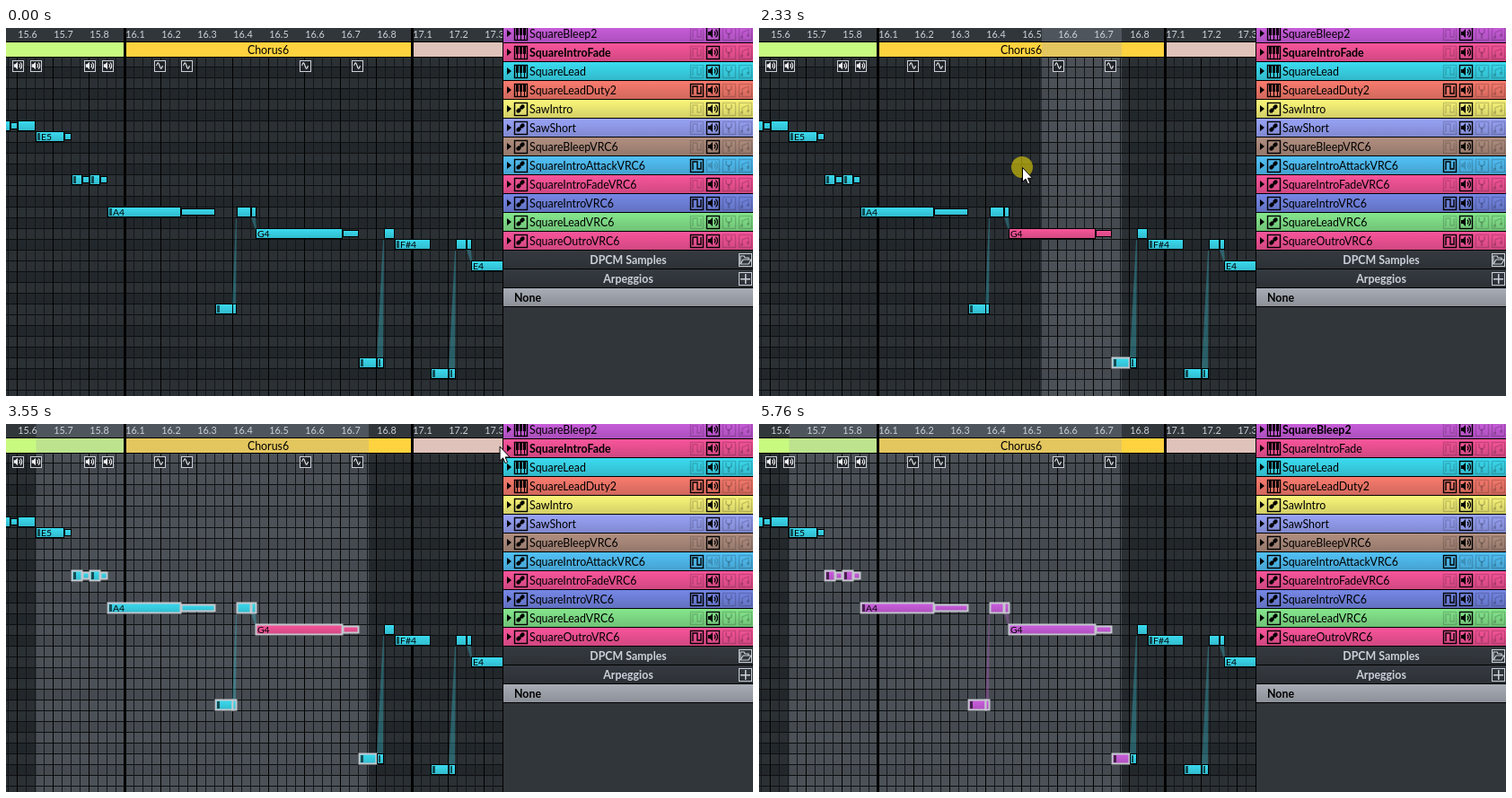
An HTML page with a canvas for the animation above (6.2 s loop, 832 px wide and 410 px high).

```html
<!DOCTYPE html>
<html>
<head>
<meta charset="utf-8">
<style>
html, body { margin: 0; height: 100%; overflow: hidden; background: #000; }
canvas { display: block; width: 832px; height: 410px; }
</style>
</head>
<body>
<canvas id="stage" width="832" height="410"></canvas>
<script>
const g = document.getElementById('stage').getContext('2d');
const LOOP = 6200, SPLIT = 553, SEL_RIGHT = 404;
const CYAN = '#3bdcf1', PINK = '#f8559a', PURPLE = '#cd5fe0', LIGHT = '#ccd1d9';
const FONT = 'Lato, "Open Sans", sans-serif';

// The screen refreshes at these moments: first, last, count
const times = [0];
for (const [a, b, n] of [[220, 780, 6], [880, 1440, 6], [1660, 2000, 4], [2210, 2770, 6],
  [2870, 3430, 6], [3550, 4110, 6], [4210, 4770, 6], [4870, 4870, 1], [5320, 5760, 5]])
  for (let i = 0; i < n; i++) times.push(a + (n > 1 ? (b - a) * i / (n - 1) : 0));

const ease = {
  in: u => u * u,
  out: u => 1 - (1 - u) ** 2,
  both: u => u * u * (3 - 2 * u)
};
// Pointer path: time, x, y, easing used to get there
const path = [
  [220, 727, 212], [780, 648, 25, 'both'], [880, 606, 37, 'in'], [1440, 345, 232, 'out'],
  [1660, 345, 232, 'in'], [2000, 403, 176, 'both'], [2110, 403, 176, 'in'],
  [2322, 293, 155, 'in'], [2870, 35, 142, 'out'], [2985, 36, 142, 'in'],
  [3430, 501, 33, 'both'], [4110, 652, 7, 'out'], [4770, 199, 180, 'both'],
  [5210, 199, 180, 'in'], [5650, 701, 348, 'both']
];
function pointer(t) {
  const i = path.findIndex(k => k[0] >= t);
  if (i < 0) return path[path.length - 1].slice(1);
  if (i === 0) return path[0].slice(1);
  const a = path[i - 1], b = path[i], u = ease[b[3]]((t - a[0]) / (b[0] - a[0]));
  return [a[1] + (b[1] - a[1]) * u, a[2] + (b[2] - a[2]) * u];
}

// Notes: x, width, row centre, release width, attack mark, label
const notes = [
  [-20, 25, 109, 8], [13, 20, 109, 0], [33, 32, 121, 8, 1, 'E5'],
  [73, 12, 169, 8, 1], [93, 12, 169, 8, 1], [113, 82, 205, 38, 1, 'A4'],
  [233, 20, 313, 0, 1], [252, 5, 313, 0], [257, 16, 205, 0], [273, 6, 205, 0],
  [278, 97, 229, 18, 0, 'G4'], [393, 20, 373, 0, 1], [413, 8, 373, 0, 1],
  [421, 12, 229, 0], [433, 40, 241, 0, 1, 'F#4'], [473, 20, 385, 0, 1],
  [493, 8, 385, 0, 1], [501, 12, 241, 0], [513, 6, 241, 0], [518, 40, 265, 0, 0, 'E4']
];
// Slides: left, right, from y, to y
const slides = [[252, 256, 308, 212], [273, 278, 211, 226], [413, 420, 368, 236],
  [493, 500, 380, 248], [513, 518, 247, 262]];

// Instruments: name, colour, duty icon lit
const rows = [
  ['SquareBleep2', PURPLE], ['SquareIntroFade', PINK], ['SquareLead', CYAN],
  ['SquareLeadDuty2', '#f97b6e', 1], ['SawIntro', '#fbf77a'], ['SawShort', '#98a3f7'],
  ['SquareBleepVRC6', '#b18f80'], ['SquareIntroAttackVRC6', '#52c1f7', 1],
  ['SquareIntroFadeVRC6', PINK], ['SquareIntroVRC6', '#7587e6', 1],
  ['SquareLeadVRC6', '#85e78d'], ['SquareOutroVRC6', PINK, 1]
];

function box(x, y, w, h, c) { g.fillStyle = c; g.fillRect(x, y, w, h); }
function shaded(x, y, w, h, c) {
  box(x, y, w, h, c);
  const s = g.createLinearGradient(0, y, 0, y + h);
  s.addColorStop(0, 'rgba(0,0,0,0)');
  s.addColorStop(1, 'rgba(0,0,0,.16)');
  box(x, y, w, h, s);
}
function frame(x, y, w, h, c, lw = 1) {
  g.strokeStyle = c; g.lineWidth = lw;
  g.strokeRect(x + .5, y + .5, w - 1, h - 1);
}
function text(s, x, y, size, c, align = 'left', weight = 400) {
  g.font = `${weight} ${size}px ${FONT}`;
  g.textAlign = align; g.textBaseline = 'middle'; g.fillStyle = c;
  g.fillText(s, x, y + 1);
}
function poly(p, fill, stroke, lw = 1) {
  g.beginPath();
  for (let i = 0; i < p.length; i += 2) g.lineTo(p[i], p[i + 1]);
  g.closePath();
  if (fill) { g.fillStyle = fill; g.fill(); }
  if (stroke) { g.strokeStyle = stroke; g.lineWidth = lw; g.stroke(); }
}
function line(p, c, lw = 1) {
  g.beginPath();
  for (let i = 0; i < p.length; i += 2) g.lineTo(p[i], p[i + 1]);
  g.strokeStyle = c; g.lineWidth = lw; g.stroke();
}
function at(x, y, draw, alpha = 1) {
  g.save(); g.translate(x, y); g.globalAlpha = alpha; draw(); g.restore();
}

// Icons, each centred on 0,0
function speaker(c) {
  poly([-5, -2, -3, -2, 0, -5, 0, 5, -3, 2, -5, 2], c);
  for (const r of [3, 5.5]) {
    g.beginPath(); g.arc(0, 0, r, -.9, .9);
    g.strokeStyle = c; g.lineWidth = 1.3; g.stroke();
  }
}
function sine(c) {
  g.beginPath(); g.moveTo(-4, 0);
  g.bezierCurveTo(-2, -7, -1, -3, 0, 0);
  g.bezierCurveTo(1, 3, 2, 7, 4, 0);
  g.strokeStyle = c; g.lineWidth = 1.2; g.stroke();
}
function border() { frame(-7, -7, 15, 15, '#000', 1.4); }
function piano() {
  border();
  for (const x of [-4, 0, 4]) { box(x - 1, -6, 3, 8, '#000'); box(x, 2, 1, 5, '#000'); }
}
function plug() {
  border();
  line([-4, 4, 4, -4], '#000', 2);
  poly([-5, 2, -2, -1, 1, 2, -2, 5], '#000');
  poly([-1, -2, 2, -5, 5, -2, 2, 1], '#000');
}
function duty() { border(); line([-4, 5, -4, -4, 1, -4, 1, 4, 5, 4, 5, -4], '#000', 1.4); }
function wrench() {
  border();
  line([0, 6, 0, 0], '#000', 2.5);
  line([-3, -5, -3, -1, 0, 1, 3, -1, 3, -5], '#000', 1.8);
}
function arp() {
  border();
  line([-3, 4, -3, -1, 4, -4, 4, 2], '#000', 1.3);
  box(-5, 3, 3, 3, '#000'); box(2, 1, 3, 3, '#000');
}

function drawGrid(selLeft) {
  box(0, 0, SPLIT, 410, '#2b3034');
  for (let k = -17; k < 15; k++)
    if ([1, 3, 6, 8, 10].includes((9 + k + 24) % 12)) box(0, 199 - 12 * k, SPLIT, 12, '#22272b');
  box(0, 0, SPLIT, 16, '#31363b');
  box(0, 16, 131, 17, '#c8fa80');
  box(134, 16, 318, 17, '#ffd23f');
  box(454, 16, 99, 17, '#dfc2b9');
  if (selLeft < SEL_RIGHT) box(selLeft, 0, SEL_RIGHT - selLeft, 410, 'rgba(157,164,175,.28)');
  box(0, 15, SPLIT, 1, '#000');
  box(0, 32, SPLIT, 1, '#000');
  for (let y = 43; y < 410; y += 12) box(0, y, SPLIT, 1, '#0d0f10');
  for (let x = 3; x < SPLIT; x += 10) box(x - 1, 33, 1, 377, (x - 13) % 40 ? '#14171a' : '#000');
  for (const x of [131, 451]) box(x, 0, 3, 410, '#000');

  for (let i = 0; i < 14; i++) {
    const beat = i + 5;
    text(`${15 + (beat >> 3)}.${beat % 8 + 1}`, 24 + 40 * i, 7, 10.8, LIGHT, 'center');
  }
  text('Chorus6', 292, 24, 12.4, '#000', 'center');

  const effect = (x, icon) => at(x, 42, () => {
    box(-6, -6, 12, 12, '#202428');
    frame(-6, -6, 13, 13, LIGHT);
    g.scale(.85, .85); icon('#f0f2f5');
  });
  for (const x of [13, 33, 93, 113]) effect(x, speaker);
  for (const x of [171, 201, 333, 391]) effect(x, sine);
}

function drawNotes(t, selLeft, hover) {
  const picked = x => x >= selLeft && x < SEL_RIGHT;
  const tint = x => t >= 4870 && picked(x) ? PURPLE : x === 278 && t >= 1660 ? PINK : CYAN;
  g.globalAlpha = .3;
  for (const [a, b, y0, y1] of slides) poly([a, y0, b, y0, b + 1, y1, b, y1], tint(a));
  g.globalAlpha = 1;
  for (const [x, w, y, tail, mark, label] of notes) {
    const c = tint(x), lit = x === 278 && hover;
    const edge = lit ? '#fff' : picked(x) ? '#c3c7cd' : '#000';
    const lw = edge === '#000' ? 1 : 2;
    if (tail) {
      shaded(x + w, y - 4, tail, 8, c);
      frame(x + w, y - 4, tail, 8, edge, lw);
    }
    shaded(x, y - 6, w, 12, c);
    frame(x, y - 6, w, 12, edge, lw);
    if (mark) box(x + 2, y - 4, w < 10 ? 2 : 3, 8, 'rgba(0,0,0,.62)');
    if (label) text(label, x + (mark ? 6 : 2), y, 10.4, '#000');
  }
}

function drawPanel(t) {
  box(SPLIT, 0, 279, 410, '#000');
  box(554, 311, 278, 99, '#31363b');
  const active = t >= 4110 ? 0 : 1;
  rows.forEach(([name, color, lit], i) => {
    const y = 6 + 21 * i;
    shaded(554, y - 10, 278, 20, color);
    poly([558, y - 4, 563, y, 558, y + 4], '#000');
    at(573, y, i < 4 ? piano : plug);
    text(name, 583, y, 12.4, '#000', 'left', i === active ? 700 : 400);
    at(769, y, duty, lit ? 1 : .18);
    at(787, y, () => { border(); speaker('#000'); }, i === 7 ? .18 : 1);
    at(805, y, wrench, .18);
    at(823, y, arp, .18);
    if (i === 1 && t >= 880 && t < 980) {
      g.globalAlpha = .68;
      shaded(554, y - 10, 278, 20, color);
      g.globalAlpha = 1;
    }
  });
  shaded(554, 248, 278, 20, '#353a40');
  shaded(554, 269, 278, 20, '#353a40');
  shaded(554, 290, 278, 20, '#a7acb5');
  text('DPCM Samples', 693, 258, 12.4, LIGHT, 'center', 700);
  text('Arpeggios', 693, 279, 12.4, LIGHT, 'center', 700);
  text('None', 566, 300, 12.4, '#000', 'left', 700);
  at(823, 258, () => {
    frame(-7, -7, 15, 15, LIGHT);
    line([-5, 5, -5, -4, -1, -4, 0, -2, 4, -2, 4, 0], LIGHT, 1.2);
    poly([-5, 5, -2, 0, 7, 0, 4, 5], null, LIGHT, 1.2);
  });
  at(823, 279, () => {
    frame(-7, -7, 15, 15, LIGHT);
    box(-5, 0, 11, 1.5, LIGHT); box(0, -5, 1.5, 11, LIGHT);
  });
}

function drawPointer(t, x, y, hover) {
  const between = (a, b) => t >= a && t < b;
  if (between(780, 1660) || between(2000, 2900) || between(4110, 4870)) {
    g.beginPath(); g.arc(x, y, 12, 0, 7);
    g.fillStyle = 'rgba(232,215,8,.6)'; g.fill();
  }
  at(x, y, () => {
    if (hover) {
      for (let i = 0; i < 4; i++) {
        poly([-1.5, 0, -1.5, -7, -4.5, -7, 0, -11.5, 4.5, -7, 1.5, -7, 1.5, 0], '#fff', '#000');
        g.rotate(Math.PI / 2);
      }
      box(-1.2, -6, 2.4, 12, '#fff'); box(-6, -1.2, 12, 2.4, '#fff');
      return;
    }
    if (between(880, 1660) || between(4200, 4870)) {
      frame(5, 14, 10, 9, '#000');
      g.setLineDash([1, 1]); frame(5, 14, 10, 9, '#fff'); g.setLineDash([]);
    }
    poly([.5, .5, .5, 16.5, 4, 13.2, 6.5, 19, 9, 18, 6.5, 12.3, 11.5, 12.3], '#fff', '#000');
  });
}

function draw(now) {
  const clock = now % LOOP, t = times.filter(s => s <= clock + .01).pop();
  const [x, y] = pointer(t);
  const hover = t >= 1660 && t < 1700;
  const selLeft = t > 2110 ? Math.round(pointer(Math.min(t - 25, 2870))[0] - 2) : SEL_RIGHT;
  // Once the drag ends the selection snaps to the grid
  const left = t >= 2870 ? 33.5 : selLeft;
  g.clearRect(0, 0, 832, 410);
  g.save();
  g.beginPath(); g.rect(0, 0, SPLIT, 410); g.clip();
  drawGrid(left);
  drawNotes(t, left, hover);
  g.restore();
  drawPanel(t);
  if (t >= 220 && t < 5755) drawPointer(t, x, y, hover);
}

const start = performance.now();
function tick() {
  draw(performance.now() - start);
  requestAnimationFrame(tick);
}
tick();
</script>
</body>
</html>
```
